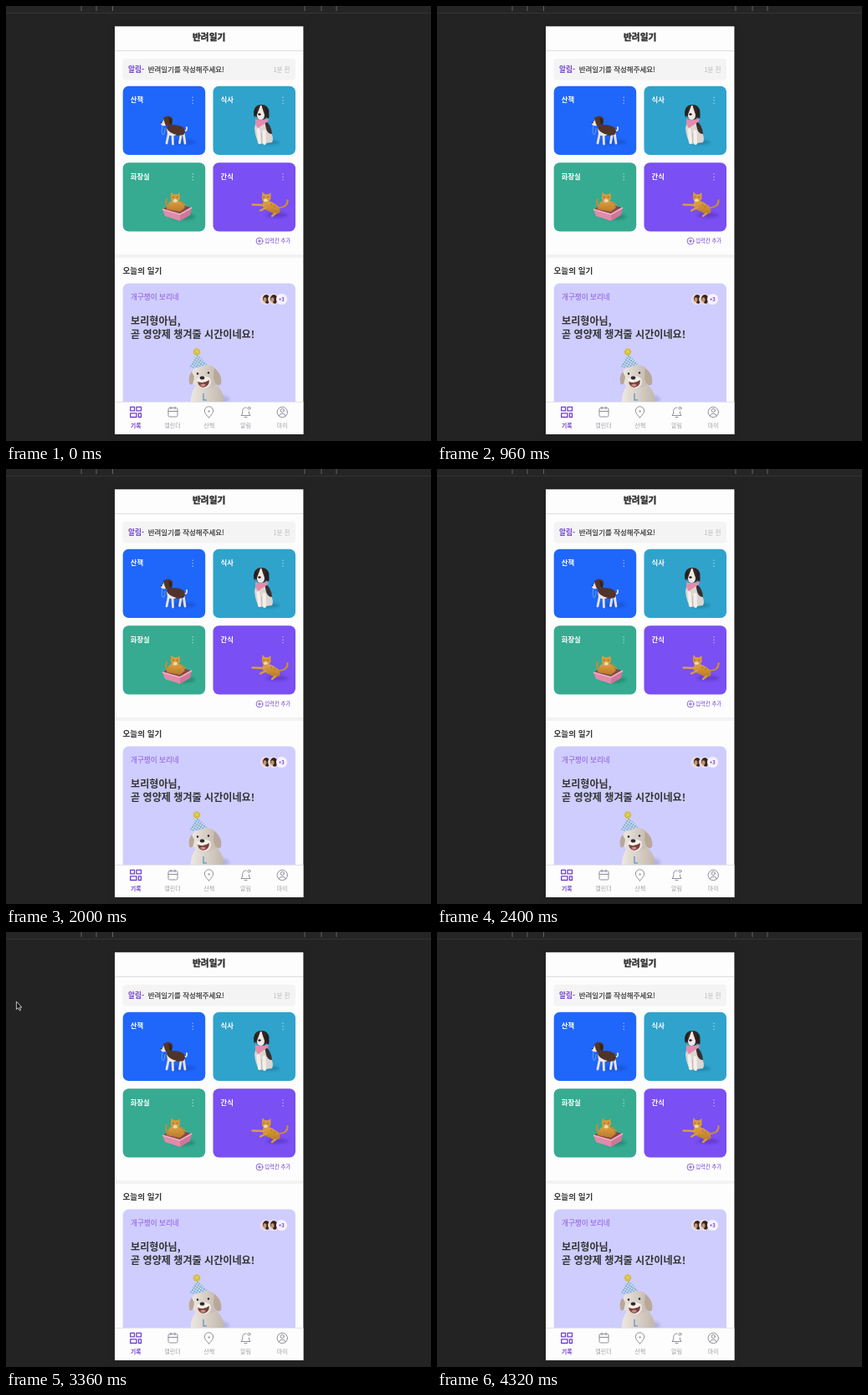
Write an HTML page that moves like this. It is 508x520 px and loops after 4400 ms.

```html
<!DOCTYPE html>
<html lang="ko">
<head>
<meta charset="utf-8">
<title>반려일기</title>
<style>
html, body { margin: 0; width: 100%; height: 100%; overflow: hidden; background: #232323; }
svg { display: block; }
text { font-family: "Noto Sans CJK KR", "Noto Sans CJK", "Noto Sans", sans-serif; fill: #333; }
.bold { font-weight: 700; }
.heavy { font-weight: 700; stroke: #333; stroke-width: .45; }
.mid { stroke: #333; stroke-width: .2; }
.purple { fill: #7040cf; }
.card text { fill: #fff; font-weight: 700; font-size: 8.4px; }
.icon { fill: none; stroke: #8f8f9c; stroke-width: 1; stroke-linejoin: round; stroke-linecap: round; }
.icon.on { stroke: #7040cf; stroke-width: 1.3; }
.icon.thin { stroke-width: .8; }
.tab { font-size: 7.1px; text-anchor: middle; fill: #a0a0aa; }
.tab.on { fill: #7040cf; font-weight: 700; font-size: 6.8px; }
</style>
</head>
<body>
<svg width="508" height="520" viewBox="0 0 508 520">
  <defs>
    <filter id="soft" x="-50%" y="-50%" width="200%" height="200%"><feGaussianBlur stdDeviation="1.5"/></filter>
    <filter id="blend"><feGaussianBlur stdDeviation=".35"/></filter>
    <pattern id="check" width="4" height="4" patternUnits="userSpaceOnUse" patternTransform="rotate(-12)">
      <rect width="4" height="4" fill="#d3e0ec"/>
      <path d="M0 0h2v2h-2zM2 2h2v2h-2z" fill="#7fa8d6"/>
    </pattern>
    <pattern id="weave" width="3" height="3" patternUnits="userSpaceOnUse">
      <rect width="3" height="3" fill="#e79ab5"/>
      <path d="M0 0h1.5v1.5h-1.5zM1.5 1.5h1.5v1.5h-1.5z" fill="#d97c9e"/>
    </pattern>
    <linearGradient id="fur" x2="1">
      <stop offset="0" stop-color="#eee8e0"/><stop offset="1" stop-color="#c1b6ac"/>
    </linearGradient>
    <linearGradient id="ginger" x2="0" y2="1">
      <stop offset="0" stop-color="#dfa344"/><stop offset="1" stop-color="#b87928"/>
    </linearGradient>
    <clipPath id="diary"><rect x="139" y="331" width="207" height="142"/></clipPath>
    <g id="avatar">
      <circle r="6.4" fill="#f3eefc"/>
      <circle r="5.7" fill="#e6d3c8"/>
      <path d="M-3.5 1Q-4-5 1-5.5Q6-4 5.300 2L3 5Q0 6-1 3z" fill="#38251f"/>
      <ellipse cx="-1" cy=".6" rx="2" ry="2.800" fill="#c2937a"/>
    </g>
  </defs>

  <rect width="508" height="520" fill="#232323"/>
  <rect width="508" height="8" fill="#252525"/>
  <rect y="8" width="508" height="1" fill="#343434"/>
  <path d="M90 0V6M108 0V6M127.500 0V6M357 0V6M377 0V6M395 0V6" stroke="#626262"/>
  <rect x="124" y="18" width="238" height="502" fill="#222"/>
  <rect x="130" y="24.300" width="225.400" height="487.700" fill="#fdfdfd"/>

  <text class="heavy" x="242.700" y="41.300" font-size="10.700" text-anchor="middle">반려일기</text>
  <path d="M130 53.500H355" stroke="#dedede"/>
  <rect x="139.500" y="63" width="206.500" height="25.500" rx="4" fill="#f4f4f4"/>
  <text class="purple bold" x="146" y="78.800" font-size="8.700">알림-</text>
  <text class="mid" x="169.700" y="78.800" font-size="8.500">반려일기를 작성해주세요!</text>
  <text x="339.500" y="78.600" font-size="7.500" text-anchor="end" style="fill:#b9b9b9">1분 전</text>

  <g id="cards"></g>

  <g filter="url(#blend)">
  <!-- walking beagle -->
  <g>
    <ellipse cx="212" cy="162.500" rx="15" ry="3" fill="#164bbd" opacity=".55" filter="url(#soft)"/>
    <path d="M212.500 149Q217 150 216 145" fill="none" stroke="#eee5df" stroke-width="1.800" stroke-linecap="round"/>
    <path d="M194.500 152L192 164M199 153L199.500 165M209.500 152L207.500 163.500M212 151L214 164" stroke="#e9e2de" stroke-width="2.800" stroke-linecap="round"/>
    <path d="M193 143Q204 140 212 145Q216 150 212 154Q203 156 195 154Q190 150 193 143z" fill="#50342c"/>
    <path d="M192 146Q195 152 204 154Q197 157 193 153z" fill="#efe8e2"/>
    <path d="M188 134Q194 129 199 134Q200 140 195 143Q188 144 185.500 141Q185.500 138 188 138z" fill="#54352b"/>
    <path d="M188.500 135Q189 139 191 143Q186 144 185 141Q185.500 138 188 138z" fill="#f0e7e1"/>
    <path d="M194.500 133Q200 135 198 143Q194.500 142 194.500 133z" fill="#33231f"/>
    <circle cx="185.800" cy="139.400" r=".9" fill="#211b1c"/>
    <path d="M187 143Q185 152 188 154Q190 152 190 146" fill="none" stroke="#7eb4e5" stroke-width=".7"/>
  </g>

  <!-- sitting dog with scarf -->
  <g>
    <ellipse cx="315" cy="163" rx="12" ry="3" fill="#1e7798" opacity=".6" filter="url(#soft)"/>
    <path d="M299 138Q311 135 315 146Q321 159 318 163L303 165Q298 158 297 146z" fill="#dcd5d1"/>
    <path d="M309 137Q317 141 318 153Q313 153 311 147z" fill="#38302f"/>
    <path d="M301.500 148L303 163M308.500 150L309 164" stroke="#f4efea" stroke-width="4" stroke-linecap="round"/>
    <path d="M305.500 152V164" stroke="#bdb3ae" stroke-width=".8"/>
    <path d="M297.500 122Q300 117.500 306 118Q313 118 314.500 126Q314 134 306 136Q299 135 298 129z" fill="#302726"/>
    <path d="M304 119Q306 118 306 121L309 130Q309 136 304 136Q299.500 135 300 130z" fill="#f0e9e4"/>
    <path d="M298.500 121Q294.500 126 297 133Q300 131 300 124zM311 121Q316 127 314 135.500Q310 133 310 126z" fill="#272020"/>
    <ellipse cx="303" cy="129.500" rx="1.700" ry="1.200" fill="#211b1d"/>
    <path d="M298 135Q306 138 314 134L313 138L301 146Q297 141 298 135z" fill="#e58bac"/>
  </g>

  <!-- cat in a box -->
  <g>
    <ellipse cx="212" cy="252" rx="14" ry="4" fill="#237b68" opacity=".6" filter="url(#soft)"/>
    <path d="M187 243L201 236L222 241L208 249z" fill="#84464b"/>
    <path d="M192 243Q193 233 201 232Q210 232 214 241L208 246z" fill="url(#ginger)"/>
    <path d="M197 227L197.500 222.500L200.500 225L205 225L207.500 223L208 230Q206 235 202 235Q196 234 197 227z" fill="#d69a3c"/>
    <path d="M201 230.500Q205 230.500 205 233.500Q202 236 199.500 233.500z" fill="#f0d9b6"/>
    <path d="M199.300 228.500h1.200M204.200 228.500h1.200" stroke="#50341e" stroke-width=".8"/>
    <path d="M193 240Q190 235 192 231M209 234L214 238" fill="none" stroke="#c88a35" stroke-width="2.200" stroke-linecap="round"/>
    <path d="M187 243L208 249V257L190 251z" fill="url(#weave)"/>
    <path d="M208 249L222 241L220 250L208 257z" fill="#cf7798"/>
    <path d="M187 243L208 249L222 241" fill="none" stroke="#f2b4c8" stroke-width="1.500"/>
  </g>

  <!-- stretching cat -->
  <g>
    <ellipse cx="324" cy="250" rx="13" ry="3" fill="#5532b9" opacity=".6" filter="url(#soft)"/>
    <path d="M325 241Q337 241 336.500 232" fill="none" stroke="#c98d38" stroke-width="2.200" stroke-linecap="round"/>
    <path d="M308 233Q315 232 322 237Q329 240 327 247Q322 251 316 246Q309 244 306 239z" fill="url(#ginger)"/>
    <path d="M309 238L294.500 237.500M311 241L304 244.500M322 248L318 251" stroke="#d79d45" stroke-width="2.300" stroke-linecap="round"/>
    <path d="M306 226L306.500 222L309.500 225L313.500 225L316.500 223L316.500 230Q315 235 310 235Q305 233 306 226z" fill="#d69a3c"/>
    <path d="M309 230.500Q313 230 313 233Q310 235 307.500 233z" fill="#f0d9b6"/>
    <path d="M307.500 228.500h1.200M312.500 228.500h1.200" stroke="#50341e" stroke-width=".8"/>
    <path d="M317 236l1 3M321 238l0 3" stroke="#a66b24" stroke-width=".8"/>
  </g>
  </g>

  <g class="icon on thin">
    <circle cx="303" cy="281" r="3.900"/><path d="M301.300 281h3.400M303 279.300v3.400"/>
  </g>
  <text class="purple" x="309.300" y="283.400" font-size="6.300">입력칸 추가</text>

  <rect x="130" y="297" width="225" height="4" fill="#f2f2f2"/>
  <text class="bold" x="139.500" y="320" font-size="9.600">오늘의 일기</text>
  <path d="M139.700 473V338.500a7 7 0 0 1 7-7H339a7 7 0 0 1 7 7V473z" fill="#cfcdfe"/>
  <text x="149" y="351.200" font-size="8.600" style="fill:#8d55db">개구쟁이 보리네</text>
  <use href="#avatar" x="310.500" y="350.500"/>
  <use href="#avatar" x="319.500" y="350.500"/>
  <circle cx="329.500" cy="350.500" r="6.600" fill="#f5f1fe"/>
  <text class="purple bold" x="329.300" y="352.600" font-size="5.800" text-anchor="middle">+3</text>
  <text class="bold" x="149" y="380.800" font-size="12.100">보리형아님,</text>
  <text class="bold" x="149" y="396.700" font-size="12.100">곧 영양제 챙겨줄 시간이네요!</text>

  <!-- party dog -->
  <g clip-path="url(#diary)">
    <ellipse cx="255" cy="470" rx="12" ry="5" fill="#9a97cf" opacity=".5" filter="url(#soft)"/>
    <g filter="url(#blend)">
      <path d="M226 455Q240 448 251 452Q262 462 261 477H221Q220 464 226 455z" fill="url(#fur)"/>
      <path d="M222 438Q226 429 237 429Q248 428 252 436Q256 445 250 453Q239 462 227 455Q220 447 222 438z" fill="url(#fur)"/>
      <path d="M222 437Q217 443 219.500 452Q224 455 225 443zM249 433Q259 440 257 452Q251 457 248 444z" fill="#b9a899"/>
      <path d="M228 446Q235 440 244 445Q247 453 239 457Q230 458 228 446z" fill="#f3eee8"/>
      <ellipse cx="234.500" cy="444.500" rx="2.800" ry="2" fill="#30282a"/>
      <circle cx="229" cy="439.500" r="1.200" fill="#29211f"/><circle cx="242" cy="438.500" r="1.200" fill="#29211f"/>
      <path d="M229 449Q236 452 243 447Q243 455 236 456Q230 455 229 449z" fill="#754139"/>
      <path d="M232 453Q236 450 239 453Q236 457 232 453z" fill="#cf8b88"/>
      <path d="M227.500 416L219.500 432Q229 434 241 428z" fill="url(#check)"/>
      <circle cx="228" cy="413.500" r="4.300" fill="#d3bd49"/>
      <path d="M226 411l4 4M230 411l-4 4" stroke="#eadb7d" stroke-width=".8"/>
      <path d="M236 463V471H240" fill="none" stroke="#6f9dcc" stroke-width="1.500"/>
    </g>
  </g>

  <rect x="130" y="473" width="225.400" height="39" fill="#fdfdfd"/>
  <path d="M130 473.500H355" stroke="#e3e3e8"/>
  <g class="icon on">
    <path d="M148.700 479.300h4.800v4.600h-4.800zM156 479.300h5.500v4.600h-5.500zM148.700 486.800h7.300v4.700h-7.300zM158.500 486.800h3v4.700h-3z"/>
  </g>
  <g class="icon">
    <rect x="194" y="480.500" width="11" height="10.500" rx="1.500"/><path d="M194 484.500h11M197 479v3M202 479v3"/>
    <path d="M242.500 492Q237.300 487 237.300 484A5.200 5.200 0 0 1 247.700 484Q247.700 487 242.500 492z"/><circle cx="242.500" cy="484.500" r=".7"/>
    <path d="M287 480Q282.700 480 282.700 484.500V487L281 489.500H292L290.500 487V485M285 491.500h3"/><circle cx="290.500" cy="480.800" r="1.500"/>
    <circle cx="330.300" cy="485.500" r="6.200"/><circle cx="330.300" cy="483.500" r="2.100"/><path d="M326.300 490Q326.800 487.300 330.300 487.300T334.300 490"/>
  </g>
  <g id="tabs"></g>

  <path id="cursor" d="M0 0V9.500L2.200 7.600L3.800 10.900L5.300 10.200L3.900 7H6.500z" fill="#151515" stroke="#e9e9e9" stroke-width=".8" visibility="hidden"/>
</svg>
<script>
const LOOP = 4400, STEP = 80;
const byId = id => document.getElementById(id);

const card = (label, x, y, color) => `<g class="card">
  <rect x="${x}" y="${y}" width="98.5" height="82.3" rx="7" fill="${color}"/>
  <text x="${x + 9}" y="${y + 19.5}">${label}</text>
  ${[13.5, 17, 20.5].map(dy => `<circle cx="${x + 83.5}" cy="${y + dy}" r=".7" fill="#fff" opacity=".65"/>`).join("")}
</g>`;

byId("cards").innerHTML = [
  ["산책", 139.7, 95.7, "#1f66fb"],
  ["식사", 247.5, 95.7, "#2fa3cc"],
  ["화장실", 139.7, 187.2, "#36ab91"],
  ["간식", 247.5, 187.2, "#7a4ff3"]
].map(args => card(...args)).join("");

byId("tabs").innerHTML = ["기록", "캘린더", "산책", "알림", "마이"].map((label, i) =>
  `<text class="tab${i ? "" : " on"}" x="${155.3 + i * 43.75}" y="503.8">${label}</text>`).join("");

// The pointer appears at the left, then sweeps out past the lower right.
const SWEEP = { start: 3360, end: 3920, from: [12.4, 83], to: [494, 512] };
const cursor = byId("cursor");

function draw(time) {
  const t = Math.floor((time % LOOP) / STEP) * STEP;
  const visible = t >= SWEEP.start && t < SWEEP.end;
  cursor.setAttribute("visibility", visible ? "visible" : "hidden");
  if (!visible) return;
  const p = (t - SWEEP.start) / (SWEEP.end - STEP - SWEEP.start);
  const eased = p * p * (3 - 2 * p);
  const [x, y] = SWEEP.from.map((a, i) => a + (SWEEP.to[i] - a) * eased);
  cursor.setAttribute("transform", `translate(${x} ${y})`);
}

const begin = performance.now();
function tick() {
  draw(performance.now() - begin);
  requestAnimationFrame(tick);
}
tick();
</script>
</body>
</html>
```
